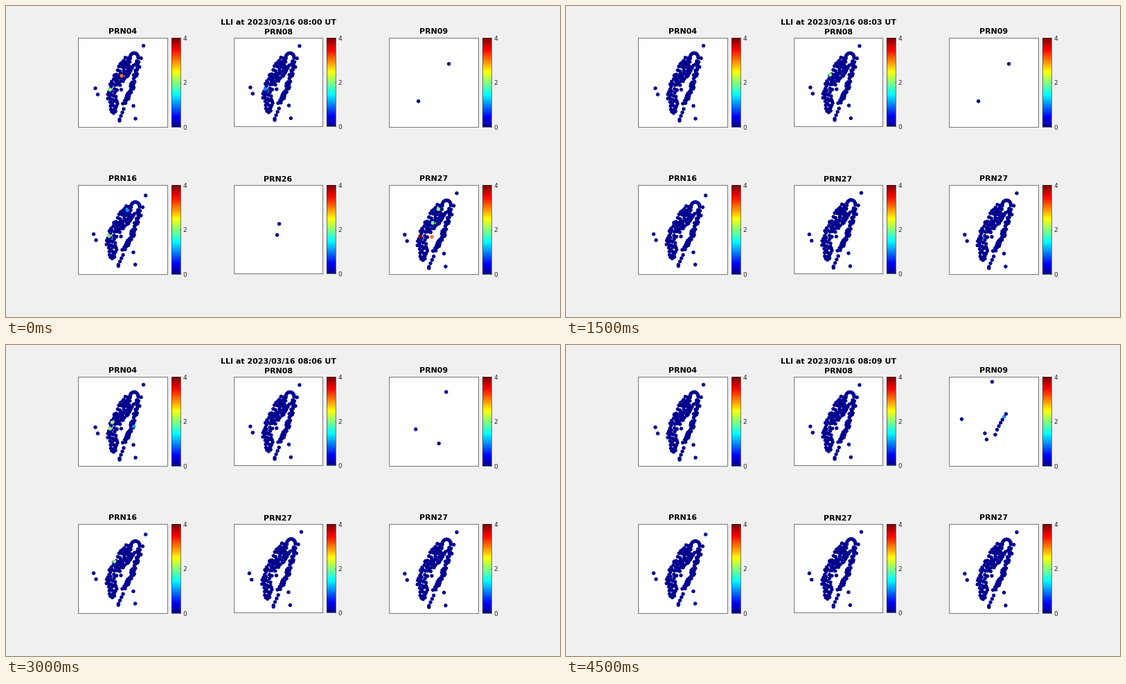
Animation of 800x450 px, one loop 5 s. Source, as a matplotlib script:

```python
import numpy as np
import matplotlib.pyplot as plt
from matplotlib.animation import FuncAnimation
from matplotlib.patches import Rectangle

W, H, DPI = 800, 450, 100
PX = 72 / DPI
FRAMES, INTERVAL = 10, 500
INK = "#262626"

plt.rcParams["font.family"] = "DejaVu Sans"


def jet(i):
    """Colour i (1..64) of the 64-step jet map."""
    return [float(np.clip(1.5 - abs(i / 16 - k), 0, 1)) for k in (3, 2, 1)]


def level(v):
    return jet(min(int(v * 16) + 1, 64))


def curve(y, *pts):
    """x on a polyline whose points run from north to south."""
    px, py = zip(*pts)
    return np.interp(y, py, px)


def scatter_belt(rng, n, gap, place):
    """n random stations from place(), kept at least gap apart."""
    out = []
    for _ in range(6000):
        p = place(rng)
        if all(np.hypot(p[0] - q[0], p[1] - q[1]) >= gap for q in out):
            out.append(p)
        if len(out) == n:
            break
    return out


def west(rng):
    y = rng.uniform(74, 155)
    x = curve(y, (170, 74), (157, 98), (150, 112), (145, 129), (153, 155))
    width = curve(y, (9, 74), (22, 95), (15, 118), (13, 140), (5, 155))
    return x + width * rng.random(), y


def east(rng):
    y = rng.uniform(79, 142)
    x = curve(y, (191, 79), (193, 88), (186, 108), (184, 120), (173, 142))
    return x - 5 * rng.random() ** 1.5, y


def make_network(seed=4):
    """Island stations, in pixels of the first panel."""
    rng = np.random.default_rng(seed)
    a = np.linspace(0, np.pi, 9)
    cape = np.c_[185 + 6 * np.cos(a), 75 - 7 * np.sin(a)]
    ridge = np.c_[np.linspace(184, 176, 5), np.linspace(86, 101, 5)]
    tail = np.c_[np.linspace(170, 164, 4), np.linspace(149, 164, 4)]
    islets = [(198.5, 57.5), (195, 75.5), (129, 119), (132.5, 128),
              (184, 144.5), (187, 163), (164, 166)]
    return np.vstack([scatter_belt(rng, 78, 3.1, west),
                      scatter_belt(rng, 34, 2.6, east),
                      cape, ridge, tail, islets])


NETWORK = make_network()
HOME = np.array([168.5, 110.8])
SITES = dict(A=(150.3, 121), B=(153.5, 112), C=(167, 101), D=(157, 100),
             E=(174, 81), F=(166.4, 121), G=(184.5, 118))

# Linear map of the network as seen through each satellite
VIEWS = {
    "PRN04": [[1, 0], [0, 1]],
    "PRN08": [[1.015, -.008], [.015, .992]],
    "PRN16": [[1.055, -.027], [.037, .952]],
    "PRN27": [[1.046, -.038], [.029, 1.008]],
}

# Flagged sites and values by (panel, minute)
FLAGS = {
    (0, 0): dict(C=3, A=2), (0, 5): dict(B=3, A=1),
    (0, 6): dict(B=2, A=2, G=1), (0, 7): dict(B=4),
    (1, 0): dict(A=1), (1, 7): dict(B=2),
    **{(1, m): dict(D=2) for m in (1, 2, 3)},
    (3, 0): dict(E=1, A=2), (3, 1): dict(E=1), (3, 2): dict(E=1),
    (3, 5): dict(D=1, A=1), (3, 6): dict(D=2),
    (5, 0): dict(E=2, C=2, A=4, F=3),
}

# Stations in the order they pick up the rising satellite
arc = np.linspace(0, 1, 7)
RISING = np.vstack([[(615, 53.5), (571, 107.5), (604.5, 128), (607, 137)],
                    np.c_[619.5 + 15.5 * arc, 130 - 30 * arc ** .8]])
SETTING = np.array([(391.5, 331.5), (394.5, 315.5)])


def panel_box(k):
    row, col = divmod(k, 3)
    return (104, 329, 553)[col], 46 + 213 * row, 128 if col == 1 else 129


def centre(k):
    x, y, side = panel_box(k)
    return np.array([x + side / 2, y + side / 2 + .3])


def network(k, sat, minute):
    flags = FLAGS.get((k, minute), {})
    pts = np.vstack([NETWORK, list(SITES.values())])
    vals = [0] * len(NETWORK) + [flags.get(s, 0) for s in SITES]
    return sat, centre(k) + (pts - HOME) @ np.transpose(VIEWS[sat]), vals


def sparse(k, sat, pts):
    """A few stations, with the map centred on their mean."""
    return sat, pts - pts.mean(axis=0) + centre(k), [0] * len(pts)


def panel_data(k, minute):
    """Title, dot positions and values of panel k."""
    if k == 2:
        n = 2 + round(.56 * max(0, minute - 5) ** 2)
        name, pts, vals = sparse(k, "PRN09", RISING[:n])
        if n == len(RISING):
            vals[-2] = 1
        return name, pts, vals
    if k == 4 and minute < 3:
        return sparse(k, "PRN26", SETTING[:2 if minute < 2 else 1])
    sats = ("PRN04", "PRN08", "", "PRN16", "PRN27", "PRN27")
    return network(k, sats[k], minute)


fig = plt.figure(figsize=(W / DPI, H / DPI), dpi=DPI, facecolor="#f0f0f0")
ax = fig.add_axes([0, 0, 1, 1])
ax.axis("off")


def box(x, y, w, h, fill):
    ax.add_patch(Rectangle((x, y), w, h, fc=fill, ec=INK, lw=.6 * PX))


def label(x, y, text, size=11, **kw):
    return ax.text(x, y, text, fontsize=size * PX, va="baseline", **kw)


BOLD = dict(weight="bold", ha="center", color="black")
RAMP = np.array([[jet(i)] for i in range(64, 0, -1)])
titles, dots = [], []

for k in range(6):
    x, y, side = panel_box(k)
    box(x, y, side, side, "white")
    bar = x + side + 6
    ax.imshow(RAMP, extent=(bar, bar + 13, y + side, y), aspect="auto",
              interpolation="nearest", zorder=.5)
    box(bar, y, 13, side, "none")
    for v in (0, 2, 4):
        ty = y + side * (1 - v / 4)
        ax.plot([bar + 11.5, bar + 13], [ty, ty], color=INK, lw=.6 * PX)
        label(bar + 16.6, ty + 3.8, str(v), 9, color=INK)
    base = y - (5 if k % 3 == 1 else 6)
    titles.append(label(x + side / 2, base, "", **BOLD))
    dots.append(ax.scatter([], [], s=(5.4 * PX) ** 2, linewidths=0, zorder=3))

ax.set(xlim=(0, W), ylim=(H, 0))
heading = label(393.5, 27, "", **BOLD)


def update(minute):
    heading.set_text(f"LLI at 2023/03/16 08:{minute:02d} UT")
    for k in range(6):
        name, pts, vals = panel_data(k, minute)
        titles[k].set_text(name)
        dots[k].set_offsets(pts)
        dots[k].set_facecolor([level(v) for v in vals])
    return [heading, *titles, *dots]


anim = FuncAnimation(fig, update, frames=FRAMES, interval=INTERVAL,
                     repeat=True, repeat_delay=0)
plt.show()
```
